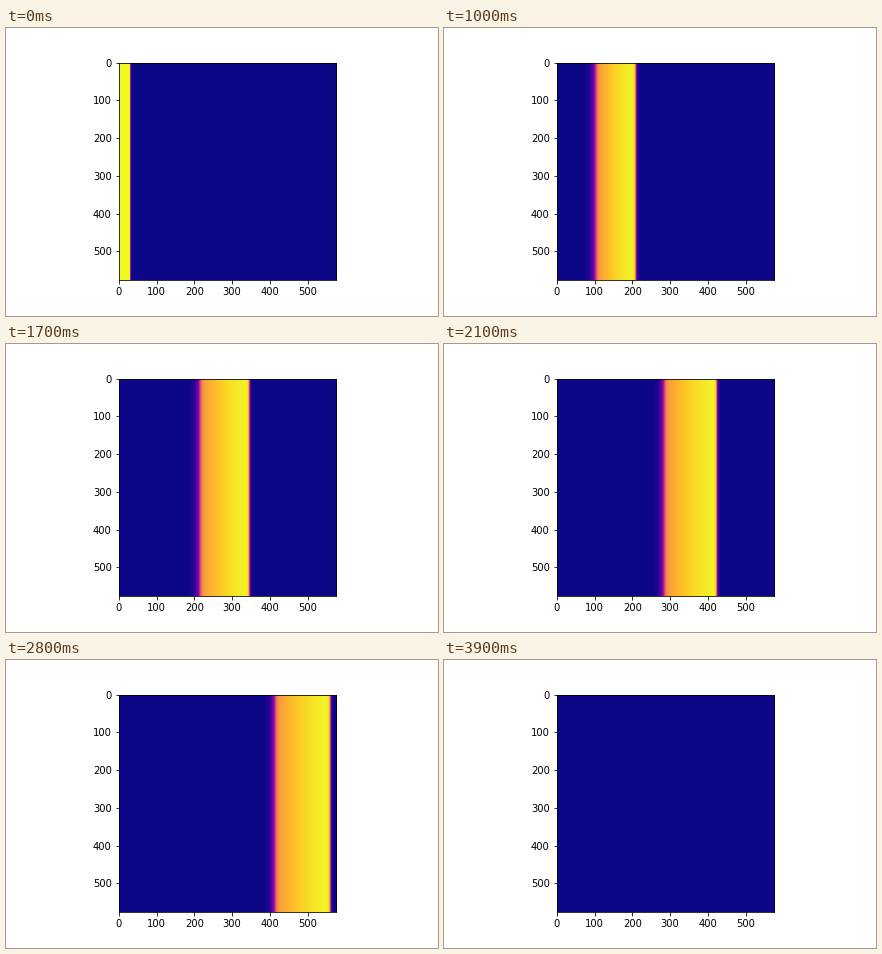
These frames come from a looping animation (432 by 288 pixels, 4.8 s). A matplotlib script:

```python
import numpy as np
import matplotlib.pyplot as plt
from matplotlib.animation import FuncAnimation

SIZE = 576
FRAMES = 48
LAST_STEP = 39      # the picture rests after this step
STIMULUS = 30       # width of the first excited strip

x = np.arange(SIZE) + 0.5

# Position of the recovering edge over time; it speeds up as the wave settles.
BACK_STEPS = [1, 2, 3, 4, 5, 6, 12, 18, 24, 30, 36, 39]
BACK_X = [-149, -70, -36, -13, 15, 41, 131, 229, 335, 449, 553, 613]


def logistic(z):
    return 1 / (1 + np.exp(-np.clip(z, -50, 50)))


def wave(step):
    """Excitation along x: steep front, sloping plateau, soft tail."""
    if step == 0:
        return (x < STIMULUS).astype(float)
    front = 14 + 19.45 * step + 16 * np.exp(-step / 1.5)
    back = np.interp(step, BACK_STEPS, BACK_X)
    s = np.clip((x - back) / (front - back), 0, 1)
    plateau = 0.985 - 0.25 * (1 - s) ** 1.7
    d = x - back
    rise = logistic(d / np.where(d < 0, 5.5, 3.0))
    return plateau * rise * logistic((front - x) / 1.5)


def field(step):
    return np.tile(wave(step), (SIZE, 1))


plt.rcParams.update({"font.family": "DejaVu Sans", "font.size": 10})
fig, ax = plt.subplots(figsize=(6, 4), dpi=72)
fig.subplots_adjust(left=0.125, right=0.9, bottom=0.125, top=0.88)
image = ax.imshow(field(0), cmap="plasma", vmin=0, vmax=1)


def update(frame):
    image.set_data(field(min(frame, LAST_STEP)))
    return [image]


anim = FuncAnimation(fig, update, frames=FRAMES, interval=100,
                     repeat=True, repeat_delay=0)
plt.show()
```
